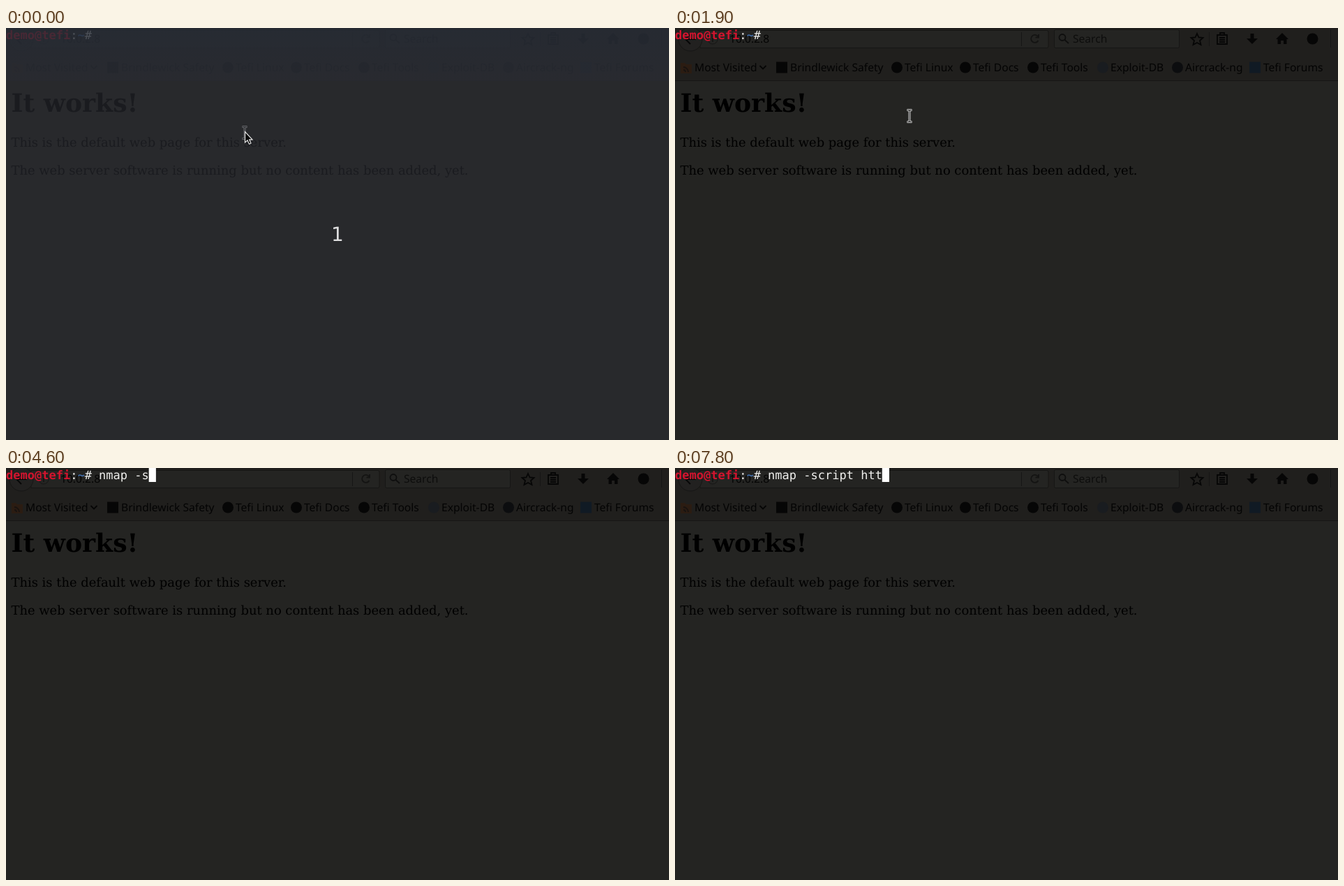
Write an HTML page that moves like this. It is 950 px wide and 590 px high and loops after 8 s.

```html
<!DOCTYPE html>
<html lang="en">
<head>
<meta charset="utf-8">
<title>Terminal over browser</title>
<style>
  html, body { margin: 0; width: 100%; height: 100%; overflow: hidden; background: #242422; }
  svg { display: block; width: 950px; height: 590px; }
  text { white-space: pre; text-rendering: geometricPrecision; }
  .ui { font: 15.6px "Noto Sans", "Open Sans", sans-serif; fill: #040404; }
  .page { font: 17.92px "DejaVu Serif", serif; fill: #000; }
  .title { font: bold 36.2px "DejaVu Serif", serif; }
  .term { font: 17px "DejaVu Sans Mono", monospace; fill: #f0f0ee; }
  .count { font: 28px "DejaVu Sans", sans-serif; fill: #dededf; }
  .line { fill: none; stroke: #060606; stroke-width: 1.8; }
  .edge { fill: none; stroke: #161615; }
  .field { fill: #242422; stroke: #161615; }
</style>
</head>
<body>
<svg viewBox="0 0 950 590">
  <defs>
    <linearGradient id="tint" x2="0" y2="1">
      <stop offset="0" stop-color="#252d39"/>
      <stop offset="1" stop-color="#2a2d35"/>
    </linearGradient>
  </defs>
  <rect width="950" height="590" fill="#242422"/>

  <g id="toolbar">
    <rect width="950" height="75" fill="#201f1d"/>
    <path class="edge" d="M0 75.5H950" stroke-width="1.2"/>
    <path class="field" d="M36 3.5H533Q535 3.5 535 6V26Q535 28.500 533 28.500H36Z"/>
    <rect class="field" x="543.500" y="2.500" width="179" height="26" rx="2"/>
    <path class="edge" d="M496.500 6V26M765.500 6V26M939.500 2V28"/>
    <circle class="edge" cx="22" cy="16" r="17" style="fill:#222120"/>
    <path class="line" d="M30 16H16M22 9L15 16L22 23" stroke-width="2.500"/>
    <circle class="edge" cx="54" cy="16" r="7"/>
    <path class="edge" d="M54 14V20M54 11V12.500" stroke-width="2"/>
    <text class="ui" x="78" y="21">10.0.2.8</text>
    <path class="line" d="M520 12A5.500 5.500 0 1 0 520.500 18M521 9V13.500H516.500" style="stroke:#141413"/>
    <g opacity=".7">
      <circle class="line" cx="555" cy="13.500" r="4.500"/>
      <path class="line" d="M558.500 17L564 22" stroke-width="3"/>
      <text class="ui" x="570" y="21">Search</text>
    </g>
    <path class="line" d="M748 8L750.500 13.500L756.500 14L752 18L753.500 24L748 21L742.500 24L744 18L739.500 14L745.500 13.500Z"/>
    <path class="line" d="M777 10H791V23H777ZM781 9V7H787V9M780 14H788M780 17H788M780 20H788"/>
    <path d="M824.500 8H829.500V15H835L827 23L819 15H824.500Z" fill="#060606"/>
    <path d="M870 7L879 16H876.500V23H872V18H868V23H863.500V16H861Z" fill="#060606"/>
    <circle cx="913.500" cy="15.500" r="8" fill="#060606"/>
    <path d="M8 50H14L16 52H24V65H8Z" fill="#2b1c12"/>
    <path d="M12 56A7 7 0 0 1 19 63M12 60A3 3 0 0 1 15 63" fill="none" stroke="#181310" stroke-width="1.800"/>
    <path class="line" d="M121.500 54L126 58.500L130.500 54" stroke-width="2"/>
    <g id="bookmarks"></g>
  </g>

  <g class="page">
    <text class="title" x="7.500" y="120">It works!</text>
    <text x="7.500" y="170">This is the default web page for this server.</text>
    <text x="7.500" y="210">The web server software is running but no content has been added, yet.</text>
  </g>

  <g class="term">
    <text y="16"><tspan font-weight="bold" fill="#d3142e">demo@tefi</tspan>:<tspan font-weight="bold" fill="#426ca6">~</tspan># <tspan id="typed"></tspan></text>
    <rect id="caret" width="10.200" height="20" fill="#fff"/>
  </g>

  <g id="beam" fill="none">
    <path d="M-3.500 -8.500H3.500M0 -8.500V8.500M-3.500 8.500H3.500" stroke="#d8d8d8" stroke-width="3"/>
    <path d="M-3 -8.500H3M0 -8.500V8.500M-3 8.500H3" stroke="#161616"/>
  </g>

  <g id="countdown">
    <rect width="950" height="590" fill="#2a2d32" opacity=".62"/>
    <rect width="950" height="76" fill="url(#tint)" opacity=".5"/>
    <path d="M342.500 148.500V164L346 160.800L348.500 166.200L351 165L348.700 159.800H353Z" fill="#080808" stroke="#e4e4e4" stroke-width="1.200"/>
    <text class="count" x="475" y="305" text-anchor="middle">1</text>
  </g>
</svg>
<script>
const DURATION = 8000, CELL = 10.234, PROMPT_CELLS = 13;
const COMMAND = "nmap -script htt";
const KEY_TIMES = [2300, 2500, 2700, 2900, 3100, 4400, 4600, 4800,
                   5000, 5200, 5300, 5600, 5800, 7500, 7600, 7800];
const CARET_ON = [[100, 700], [1400, 1900], [2300, 3600], [4200, 6400], [7000, DURATION]];
const BEAM_PATH = [[0, 342, 150], [500, 341, 146], [600, 337, 133], [700, 336, 126]];
const BEAM_HIDDEN = 2400;

// label, text x, icon x, icon colour, round icon
const BOOKMARKS = [
  ["Most Visited", 28],
  ["Brindlewick Safety", 165, 145, "#060606"],
  ["Tefi Linux", 329, 310, "#060606", true],
  ["Tefi Docs", 427, 408, "#060606", true],
  ["Tefi Tools", 524, 505, "#060606", true],
  ["Exploit-DB", 624, 605, "#191c20", true],
  ["Aircrack-ng", 731, 712, "#0c0d0f", true],
  ["Tefi Forums", 843, 823, "#101a24"]
];

const byId = id => document.getElementById(id);
const show = (node, visible) => node.setAttribute("visibility", visible ? "visible" : "hidden");
const [toolbar, typed, caret, beam, countdown] =
  ["toolbar", "typed", "caret", "beam", "countdown"].map(byId);

byId("bookmarks").innerHTML = BOOKMARKS.map(([label, x, iconX, color, round]) =>
  (color ? `<rect x="${iconX}" y="48.500" width="16" height="16" rx="${round ? 8 : 0}" fill="${color}"/>` : "") +
  `<text class="ui" x="${x}" y="62">${label}</text>`).join("");

function render(t) {
  const count = KEY_TIMES.filter(time => time <= t).length;
  typed.textContent = COMMAND.slice(0, count);
  caret.setAttribute("x", (PROMPT_CELLS + count) * CELL);
  show(caret, CARET_ON.some(([from, to]) => t >= from && t < to));

  const [, x, y] = BEAM_PATH.filter(([time]) => time <= t).pop();
  beam.setAttribute("transform", `translate(${x} ${y})`);
  show(beam, t < BEAM_HIDDEN);

  const counting = t < 100;
  show(countdown, counting);
  toolbar.setAttribute("opacity", counting ? 0.6 : 1);
}

const start = performance.now();
function tick() {
  render((performance.now() - start) % DURATION);
  requestAnimationFrame(tick);
}
tick();
</script>
</body>
</html>
```
